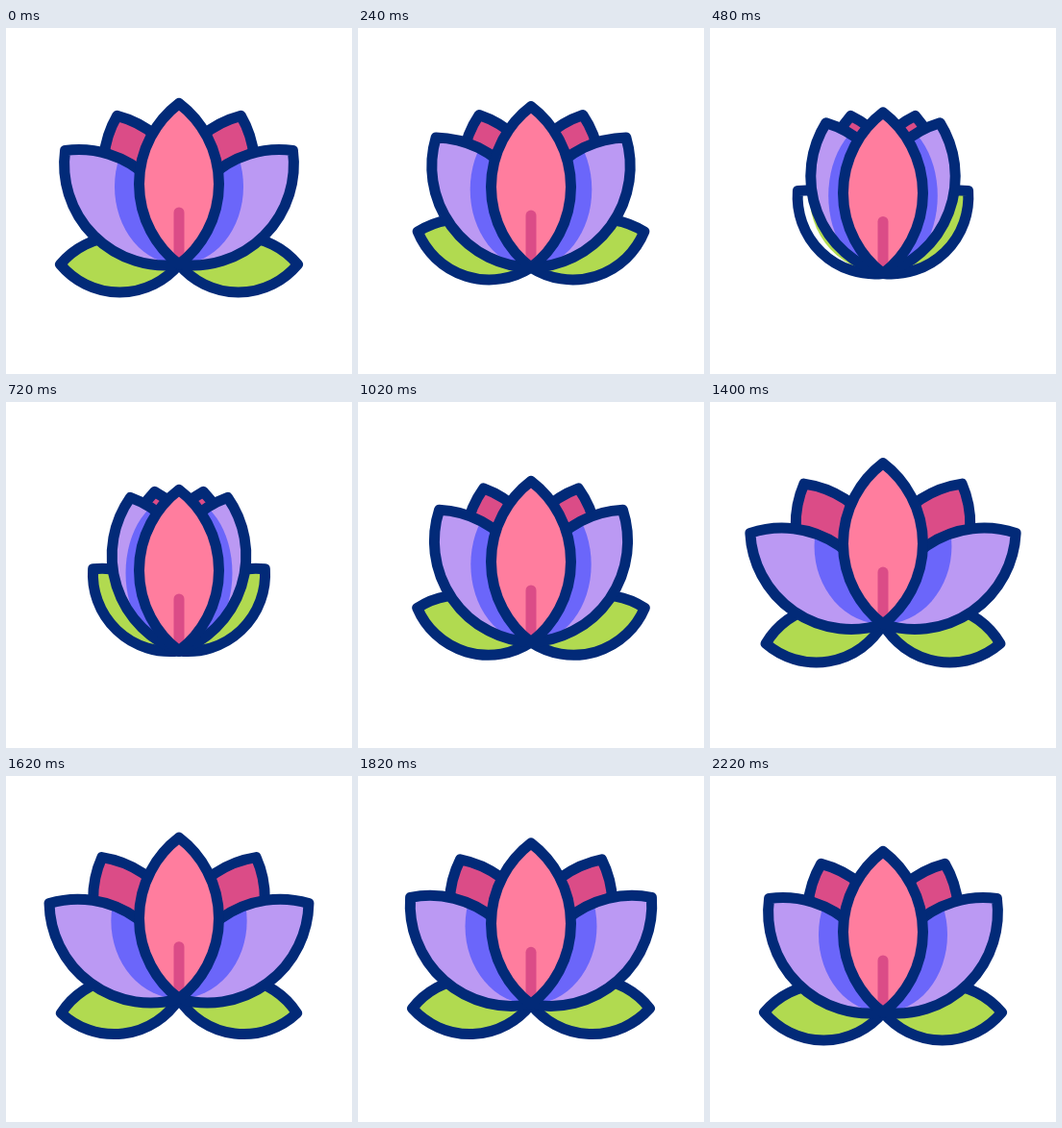
An HTML page with a canvas for the animation above (2400 ms loop, 360 by 360 pixels).

```html
<!DOCTYPE html>
<html lang="en">
<head>
<meta charset="utf-8">
<title>Lotus</title>
<style>
  html, body { margin: 0; width: 100%; height: 100%; overflow: hidden; background: #fff; }
  canvas { display: block; }
</style>
</head>
<body>
<canvas id="stage" width="360" height="360"></canvas>
<script>
const ctx = document.getElementById('stage').getContext('2d');
const LOOP = 2400;
const INK = '#022a78', PINK = '#ff7d9e', ROSE = '#db4c87';
const LILAC = '#bb99f3', VIOLET = '#6b66fa', GREEN = '#b1da50';

// Two circular arcs meeting at the origin and at the tip above it.
function petalPath(length, half) {
  const r = (length * length / 4 + half * half) / (2 * half);
  return new Path2D(`M0 0A${r} ${r} 0 0 1 0 ${-length}A${r} ${r} 0 0 1 0 0Z`);
}
const petal = petalPath(167.5, 41.5);
const leaf = petalPath(123.5, 29);

// Each move: [time, value] stops joined by sine easing.
const moves = {
  lift: [[0, 0], [740, 13], [1480, -15.7], [2210, 0]],
  back: [[0, 0], [690, 14], [1440, -6.9], [2200, 0]],
  side: [[0, 0], [640, 28.4], [1440, -10.8], [2060, 0]],
  leaf: [[0, 0], [580, 47.5], [1420, -9.5], [2000, 0]],
  leafLead: [[280, 0], [490, 9], [720, 0]]
};

function valueAt(stops, t) {
  if (t <= stops[0][0]) return stops[0][1];
  for (let i = 1; i < stops.length; i++) {
    const [t0, a] = stops[i - 1], [t1, b] = stops[i];
    if (t < t1) return a + (b - a) * (1 - Math.cos(Math.PI * (t - t0) / (t1 - t0))) / 2;
  }
  return stops[stops.length - 1][1];
}

function turned(degrees, paint) {
  ctx.save();
  ctx.rotate(degrees * Math.PI / 180);
  paint();
  ctx.restore();
}

function fill(path, color) {
  ctx.fillStyle = color;
  ctx.fill(path);
}

function bothSides(paint) {
  for (const side of [-1, 1]) {
    ctx.save();
    ctx.scale(side, 1);
    paint(side);
    ctx.restore();
  }
}

function draw(t) {
  const now = {};
  for (const name in moves) now[name] = valueAt(moves[name], t);

  ctx.fillStyle = '#fff';
  ctx.fillRect(0, 0, 360, 360);
  ctx.save();
  ctx.translate(180, 246 + now.lift);
  ctx.lineWidth = 11;
  ctx.lineJoin = ctx.lineCap = 'round';
  ctx.strokeStyle = INK;

  bothSides(side => {
    const angle = 90 - now.leaf;
    turned(angle - (side < 0 ? now.leafLead : 0), () => fill(leaf, GREEN));
    turned(angle, () => ctx.stroke(leaf));
  });

  bothSides(() => turned(22.6 - now.back, () => {
    fill(petal, ROSE);
    ctx.stroke(petal);
  }));

  bothSides(() => {
    const angle = 45 - now.side;
    turned(angle, () => {
      fill(petal, LILAC);
      ctx.clip(petal);
      ctx.rotate(-angle * Math.PI / 180);
      ctx.beginPath();
      ctx.ellipse(0, -81, 67 - 0.42 * now.side, 81, 0, 0, 2 * Math.PI);
      ctx.fillStyle = VIOLET;
      ctx.fill();
    });
    turned(angle, () => ctx.stroke(petal));
  });

  fill(petal, PINK);
  ctx.save();
  ctx.clip(petal);
  ctx.strokeStyle = ROSE;
  ctx.stroke(new Path2D('M0-54V0'));
  ctx.restore();
  ctx.stroke(petal);
  ctx.restore();
}

const start = performance.now();
function tick() {
  draw((performance.now() - start) % LOOP);
  requestAnimationFrame(tick);
}
tick();
</script>
</body>
</html>
```
